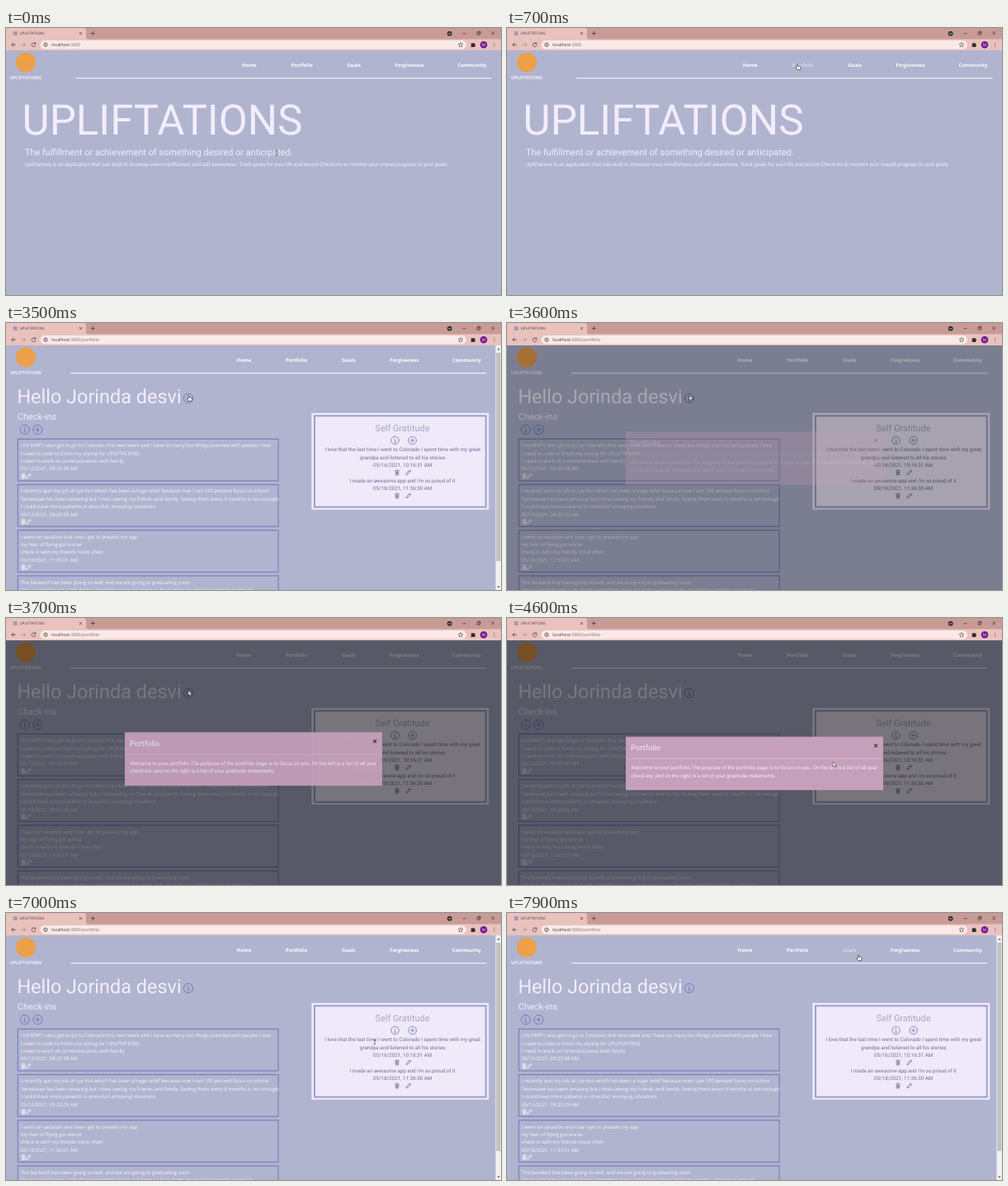
These frames come from a looping animation (600x323 px, 8000 ms). An HTML page:

```html
<!DOCTYPE html>
<html lang="en">
<head>
<meta charset="utf-8">
<title>Portfolio walkthrough</title>
<style>
  html, body { margin: 0; width: 100%; height: 100%; overflow: hidden; background: #b0b4cf; }
  svg { display: block; width: 100vw; height: 100vh; }
  text { font-family: Roboto, sans-serif; font-size: 6.25px; fill: #f3edfb; text-rendering: geometricPrecision; white-space: pre; }
  .ui, #nav text, .note { font-family: "Open Sans", sans-serif; font-size: 5.97px; }
  .note { fill: #f9f5ff; }
  #nav text { font-weight: 700; fill: #fff; }
  #nav text.hover { fill: #dcd5ee; }
  .h2 { font-size: 10.92px; }
  .mid { text-anchor: middle; }
  .thanks { fill: #6e7096; }
  .line { fill: none; stroke: #474140; stroke-width: .8; }
  .blue { fill: none; stroke: #757cbb; stroke-width: 1; }
</style>
</head>
<body>
<svg viewBox="0 0 600 323" preserveAspectRatio="none">
  <defs>
    <g id="info" class="blue">
      <circle r="5.6"/><path d="M-1 -.6H.2V2.8M-1.3 2.8H1.5M-.2 -3.1V-1.9"/>
    </g>
    <g id="plus" class="blue">
      <circle r="5.6"/><path d="M-3 0H3M0 -3V3"/>
    </g>
    <g id="tools" fill="none" stroke="currentColor" stroke-width=".8">
      <path d="M-2.5 -2.2H2.5M-.8 -3H.8M-1.9 -2L-1.6 3H1.6L1.9 -2M-.5 -1V2M.6 -1V2"/>
    </g>
    <g id="pencil" fill="none" stroke="currentColor" stroke-width=".8">
      <path d="M-2.8 2.8L-2.2 .8L1.6 -3L2.9 -1.7L-.9 2.1ZM.6 -2L1.9 -.7"/>
    </g>
  </defs>

  <rect width="600" height="323" fill="#b0b4cf"/>

  <g id="nav">
    <path d="M84.5 60.6H588.5" stroke="#f2ecfb" stroke-width="1.3"/>
  </g>
  <circle cx="24" cy="41.5" r="12" fill="#eda04a"/>
  <text x="5" y="61.6" style="font-size:5.6px;font-weight:700">UPLIFTATIONS</text>

  <g id="home">
    <text x="19.6" y="128.8" style="font-size:51px">UPLIFTATIONS</text>
    <text class="h2" x="22.9" y="153.8">The fulfillment or achievement of something desired or anticipated.</text>
    <text x="22.9" y="166.8">Upliftations is an application that was built to increase ones mindfulness and self awareness. Track goals for your life and record Check-ins to monitor your overall progress to your goals.</text>
  </g>

  <g id="portfolio">
    <text x="13.4" y="97.4" style="font-size:23.44px">Hello Jorinda desvi</text>
    <use href="#info" x="221" y="91"/>
    <text class="h2" x="13.8" y="116.7">Check-ins</text>
    <use href="#info" x="22.7" y="129"/>
    <use href="#plus" x="38.4" y="129"/>
    <g id="notes" color="#f9f5ff"></g>
    <rect x="370.3" y="108.8" width="215" height="117" fill="#efe9f9"/>
    <rect x="374" y="112.3" width="207.7" height="110.3" fill="none" stroke="#979dcd" stroke-width="1.9"/>
    <text class="h2 mid" x="480.5" y="131" style="fill:#a5a7c9">Self Gratitude</text>
    <use href="#info" transform="translate(471.5 142) scale(.85)"/>
    <use href="#plus" transform="translate(492.7 142) scale(.85)"/>
    <g id="gratitude" color="#6e7096"></g>
  </g>

  <g id="scrollbar">
    <rect x="593.4" y="27" width="6.6" height="296" fill="#f1f1f1"/>
    <rect x="594.2" y="36" width="5.2" height="252" fill="#c1c1c1"/>
    <path d="M595.3 32.5L597 30.5L598.7 32.5ZM595.3 318.5L597 320.5L598.7 318.5Z" fill="#555"/>
  </g>

  <rect id="backdrop" y="27" width="600" height="296"/>
  <g id="modal">
    <rect x="144" y="143.6" width="312" height="64.6" fill="#c69fba"/>
    <path d="M144 170.2H456" stroke="#d8bdd1" stroke-width=".6"/>
    <text x="150" y="160" style="font-size:9.375px">Portfolio</text>
    <path d="M445.2 152.6L449 156.4M449 152.6L445.2 156.4" stroke="#3f333b" stroke-width="1.2"/>
    <text x="150.2" y="183.3">Welcome to your portfolio.The purpose of the portfolio page is to focus on you. On the left is a list of all your</text>
    <text x="150.2" y="192.7">check-ins, and on the right is a list of your gratitude statements.</text>
  </g>

  <g id="browser">
    <rect width="600" height="14" fill="#c99b96"/>
    <path d="M0 13.5V0H94Q97 0 97 3V11Q97 13.5 100 13.5H600V27H0Z" fill="#e9c2be"/>
    <rect x="41.5" y="15" width="516.5" height="10.6" rx="5.3" fill="#f9eae8"/>
    <rect x="8.7" y="4" width="5" height="5" fill="#a39cb3"/>
    <text class="ui" x="16.5" y="8.3" style="font-size:4.6px;fill:#4a3f3e">UPLIFTATIONS</text>
    <text class="ui" x="55.3" y="22.4" style="font-size:5.2px;fill:#333">localhost<tspan fill="#776b6a">:3000<tspan id="path">/portfolio</tspan></tspan></text>
    <g class="line">
      <path d="M89 5L92 8M92 5L89 8M102.8 6.5H107.8M105.3 4V9"/>
      <path d="M553.5 6.7H557.5M571 5.2H574V8.2H571ZM572 5.2V4.2H575V7.2H574M588.3 4.5L592 8.2M592 4.5L588.3 8.2"/>
      <path d="M11.8 20.2H6.8M9 18L6.8 20.2L9 22.4"/>
      <path d="M18.7 20.2H23.7M21.5 18L23.7 20.2L21.5 22.4" stroke="#a98f8d"/>
      <path d="M35.6 18.9A2.4 2.4 0 1 0 35.9 21M35.9 17.5V19.3H34"/>
      <circle cx="48" cy="20.2" r="2.2"/><path d="M48 19.9V21.4M48 18.8V19.3"/>
      <path d="M551 17.4L551.8 19.3L553.9 19.5L552.3 20.9L552.8 22.9L551 21.8L549.2 22.9L549.7 20.9L548.1 19.5L550.2 19.3Z" stroke-width=".6"/>
    </g>
    <circle cx="537.7" cy="6.7" r="2.9" fill="#332e2e"/>
    <path d="M536.3 6L537.7 7.6L539.1 6" fill="none" stroke="#fff" stroke-width=".7"/>
    <path d="M563.6 18.6H565.2A1 1 0 0 1 567 18.6H568.4V20A1 1 0 0 1 568.4 21.8V23H563.6V21.6A1 1 0 0 0 563.6 19.9Z" fill="#332e2e"/>
    <circle cx="579" cy="20.2" r="4.3" fill="#72198f"/>
    <text class="ui mid" x="579" y="21.9" style="font-size:4.8px">M</text>
    <path d="M591.8 17.9V18.7M591.8 19.8V20.6M591.8 21.7V22.5" stroke="#474140"/>
  </g>

  <g id="cursor">
    <path id="arrow" d="M0 0V6L1.5 4.7L2.5 6.8L3.4 6.4L2.5 4.4H4.3Z" fill="#fff" stroke="#222" stroke-width=".5"/>
    <path id="hand" d="M-.2 .6Q.5 -.4 1.1 .6V2.6L4 3.2Q4.7 3.5 4.5 4.4L3.9 7H.4L-1.7 4.3Q-1.5 3.4 -.2 4.4Z" fill="#fff" stroke="#222" stroke-width=".6"/>
    <path id="beam" d="M-.2 .3Q1 .3 1 1Q1 .3 2.2 .3M1 1V5.2M-.2 5.9Q1 5.9 1 5.2Q1 5.9 2.2 5.9" fill="none" stroke="#333" stroke-width=".6"/>
  </g>
</svg>

<script>
const $ = id => document.getElementById(id);
const add = (id, markup) => $(id).insertAdjacentHTML('beforeend', markup);
const LINE = 9.4;

const links = [['Home', 286], ['Portfolio', 345.5], ['Goals', 413.5], ['Forgiveness', 471.5], ['Community', 547.5]];
links.forEach(([label, x]) => add('nav', `<text id="${label}" x="${x}" y="46.6">${label}</text>`));

const tools = (x, gap, y) =>
  `<use href="#tools" x="${x}" y="${y}"/><use href="#pencil" x="${x + gap}" y="${y}"/>`;

const notes = [
  ['I hit MVP! I also get to go to Colorado this next week and I have so many fun things planned with people I love',
   'I need to code to finish my styling for UPLIFTATIONS',
   'I need to work on communication with family',
   '05/12/2021, 09:23:38 AM'],
  ['I recently quit my job at Lye Hut which has been a huge relief because now I can 100 percent focus on school',
   'Tennessee has been amazing but I miss seeing my friends and family. Seeing them every 6 months is not enough.',
   'I could have more patients in stressful/ annoying situations',
   '05/12/2021, 09:20:29 AM'],
  ['I went on vacation and now i get to present my app',
   'my fear of flying got worse',
   'check in with my friends more often',
   '05/18/2021, 11:33:01 AM'],
  ['The backend has been going so well, and we are going to graduating soon.',
   "I'm so suited to not a job doing something I love, Ive been so busy lately my mind is going to overload"],
];
notes.forEach((lines, i) => {
  const top = 140.3 + i * 55.2;
  add('notes', `<rect class="blue" x="14.3" y="${top}" width="315.8" height="50.6" style="stroke-width:1.1"/>`
    + lines.map((s, n) => `<text class="note" x="17.8" y="${top + 9.9 + n * LINE}">${s}</text>`).join('')
    + tools(21, 6.3, top + 44.8));
});

const thanks = [
  [155.2, 'I love that the last time I went to Colorado I spent time with my great'],
  [164.5, 'grandpa and listened to all his stories'],
  [173.8, '05/16/2021, 10:16:31 AM'],
  [192.7, "I made an awesome app and i'm so proud of it"],
  [202, '05/18/2021, 11:36:30 AM'],
];
thanks.forEach(([y, s]) => add('gratitude', `<text class="thanks mid" x="480.7" y="${y}">${s}</text>`));
add('gratitude', tools(474, 13.8, 180.8) + tools(474, 13.8, 209));

// Pointer stops: time, x, y
const stops = [
  [0, 327, 148], [700, 351.5, 43.5], [1500, 351.5, 43.5], [1900, 330, 130], [2200, 300, 230],
  [2450, 400, 275], [2750, 575, 170], [3100, 205, 92], [3400, 221, 87.5], [4200, 221, 88.5],
  [4600, 395, 174], [4800, 395, 174], [4900, 456, 208], [5100, 456, 208], [5800, 446, 152.5],
  [7300, 446, 153], [7900, 425.5, 50.5], [8000, 425.5, 50.5],
];
// Pointer shape from each time on
const shapes = [
  [0, 'beam'], [200, 'arrow'], [600, 'hand'], [1600, 'arrow'], [3300, 'hand'],
  [3600, 'arrow'], [5700, 'hand'], [7000, 'beam'], [7500, 'arrow'], [7800, 'hand'],
];

const clamp = v => Math.min(1, Math.max(0, v));
const show = (id, on) => $(id).style.display = on ? '' : 'none';

function pointerAt(t) {
  const i = stops.findIndex(s => s[0] > t);
  const [t0, x0, y0] = stops[i - 1], [t1, x1, y1] = stops[i];
  const p = (t - t0) / (t1 - t0), k = p * p * (3 - 2 * p);
  return [x0 + (x1 - x0) * k, y0 + (y1 - y0) * k];
}

function draw(t) {
  const inside = t >= 1400, open = t > 3500 && t < 7000;
  show('home', !inside);
  show('portfolio', inside);
  show('path', inside);
  show('scrollbar', inside && !open);
  show('backdrop', open);
  show('modal', open);
  $('nav').setAttribute('transform', `translate(${inside ? -6.4 : 0} 0)`);
  $('Portfolio').classList.toggle('hover', t >= 600 && t < 1600);
  $('Goals').classList.toggle('hover', t >= 7800);

  const slide = clamp((t - 3560) / 300);
  $('backdrop').setAttribute('opacity', .5 * clamp((t - 3510) / 150));
  $('modal').setAttribute('opacity', clamp((t - 3560) / 150));
  $('modal').setAttribute('transform', `translate(0 ${-15.6 * (1 - slide) ** 1.7})`);

  $('cursor').setAttribute('transform', `translate(${pointerAt(t)})`);
  const shape = shapes.filter(s => s[0] <= t).pop()[1];
  for (const id of ['arrow', 'hand', 'beam']) show(id, id === shape);
}

const start = performance.now();
function tick() {
  draw(Math.floor((performance.now() - start) % 8000 / 100) * 100);
  requestAnimationFrame(tick);
}
tick();
</script>
</body>
</html>
```
